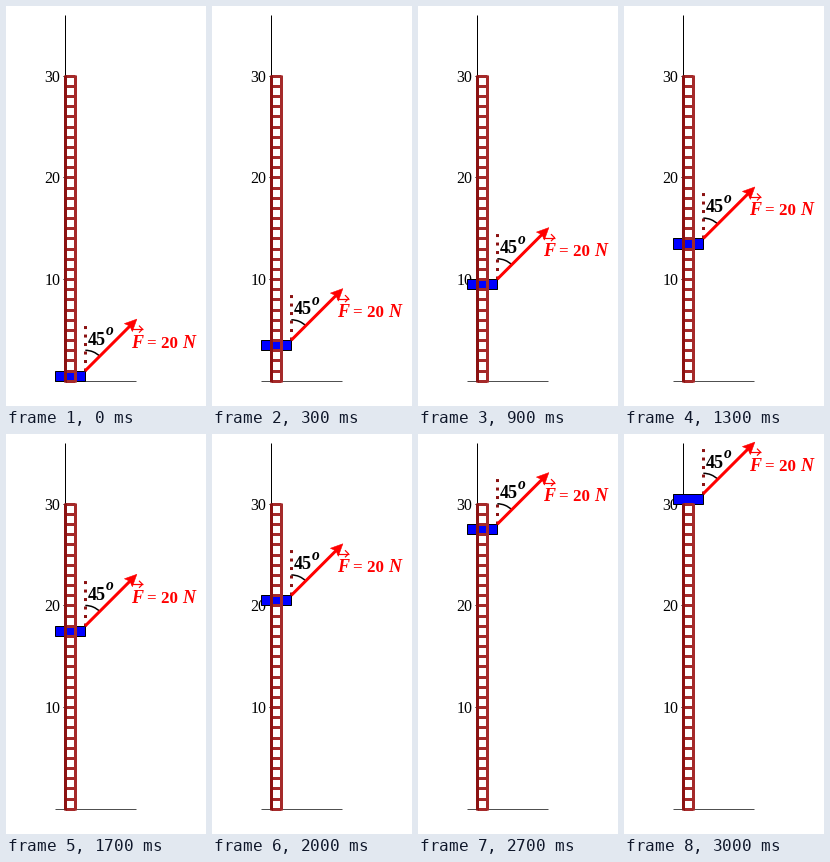
A matplotlib script that plays this animation: 200x400 px, repeating every 3100 ms.

```python
import matplotlib.pyplot as plt
from matplotlib.animation import FuncAnimation
from matplotlib.patches import Arc, Polygon, Rectangle

W, H, DPI = 200, 400, 100
PX = 72 / DPI              # points per pixel
X0, Y0, UNIT = 59.0, 374.8, 305 / 30
STEPS = 31
BROWN, DARK, RED = "#a52a2a", "#8b1212", "#ff0000"

plt.rcParams["font.family"] = "Liberation Serif"
fig = plt.figure(figsize=(W / DPI, H / DPI), dpi=DPI, facecolor="white")
ax = fig.add_axes([0, 0, 1, 1])
ax.set_xlim(0, W)
ax.set_ylim(H, 0)
ax.axis("off")


def sx(u):
    return X0 + u * UNIT


def sy(u):
    return Y0 - u * UNIT


def line(xs, ys, color, width, z, **kw):
    kw.setdefault("solid_capstyle", "butt")
    return ax.plot(xs, ys, color=color, lw=width * PX, zorder=z, **kw)[0]


def label(x, y, text, size, z=6, **kw):
    return ax.text(x, y, text, fontsize=size * PX, va="baseline", zorder=z, **kw)


# axes and ticks
line([X0, X0], [9, Y0], "black", 1, 1)
line([sx(-1), sx(7)], [Y0, Y0], "#505050", 1, 1)
for n in (10, 20, 30):
    line([56.5, X0], [sy(n), sy(n)], "black", 1, 1)
    label(38.5, sy(n) + 5.8, str(n), 16, z=1)

# ladder
for n in range(31):
    line([sx(0), sx(1)], [sy(n), sy(n)], BROWN, 3, 3)
for n, color in ((0, DARK), (1, BROWN)):
    line([sx(n), sx(n)], [sy(30) - 1, sy(0) + 1], color, 3, 4)

# moving parts; "top" is the upper edge of the block
block = ax.add_patch(Rectangle((sx(-1), 0), 3 * UNIT, UNIT, fc="blue",
                               ec="black", lw=PX, zorder=2))
PIVOT = sx(2)
TIP = 5 * UNIT + 0.7
dots = line([PIVOT, PIVOT], [0, 0], DARK, 3, 5,
            linestyle=(0, (1, 1.83)), dash_capstyle="butt")
arc = ax.add_patch(Arc((PIVOT, 0), 4 * UNIT, 4 * UNIT, theta1=270, theta2=315,
                       color="black", lw=1.5 * PX, zorder=5))
shaft = line([PIVOT, PIVOT + TIP - 5], [0, 0], RED, 3, 6)
head = ax.add_patch(Polygon([(0, 0)] * 4, fc=RED, ec=RED, lw=0.5 * PX, zorder=6))
vector = line([124.7, 136.5], [0, 0], RED, 1.2, 6)
barbs = line([133, 136.5, 133], [0, 0, 0], RED, 1.2, 6)

texts = [
    (label(82, 0, "45", 18, weight="bold"), -26),
    (label(99.7, 0, "o", 15.5, weight="bold", style="italic"), -35.3),
    (label(124.8, 0, "F", 18, weight="bold", style="italic", color=RED), -23),
    (label(141, 0, "= 20", 17, weight="bold", color=RED), -23),
    (label(176.5, 0, "N", 18, weight="bold", style="italic", color=RED), -23),
]


def update(i):
    top = sy(i + 1)
    block.set_y(top)
    dots.set_ydata([top, top - 46])
    arc.set_center((PIVOT, top))
    shaft.set_ydata([top, top - TIP + 5])
    tip_x, tip_y = PIVOT + TIP, top - TIP
    head.set_xy([(tip_x, tip_y), (tip_x - 12.5, tip_y + 4.5),
                 (tip_x - 7, tip_y + 7), (tip_x - 4.5, tip_y + 12.5)])
    y = top - 41.5
    vector.set_ydata([y, y])
    barbs.set_ydata([y - 3.5, y, y + 3.5])
    for text, offset in texts:
        text.set_y(top + offset)
    return []


anim = FuncAnimation(fig, update, frames=STEPS, interval=100,
                     repeat=True, repeat_delay=0)
plt.show()
```
